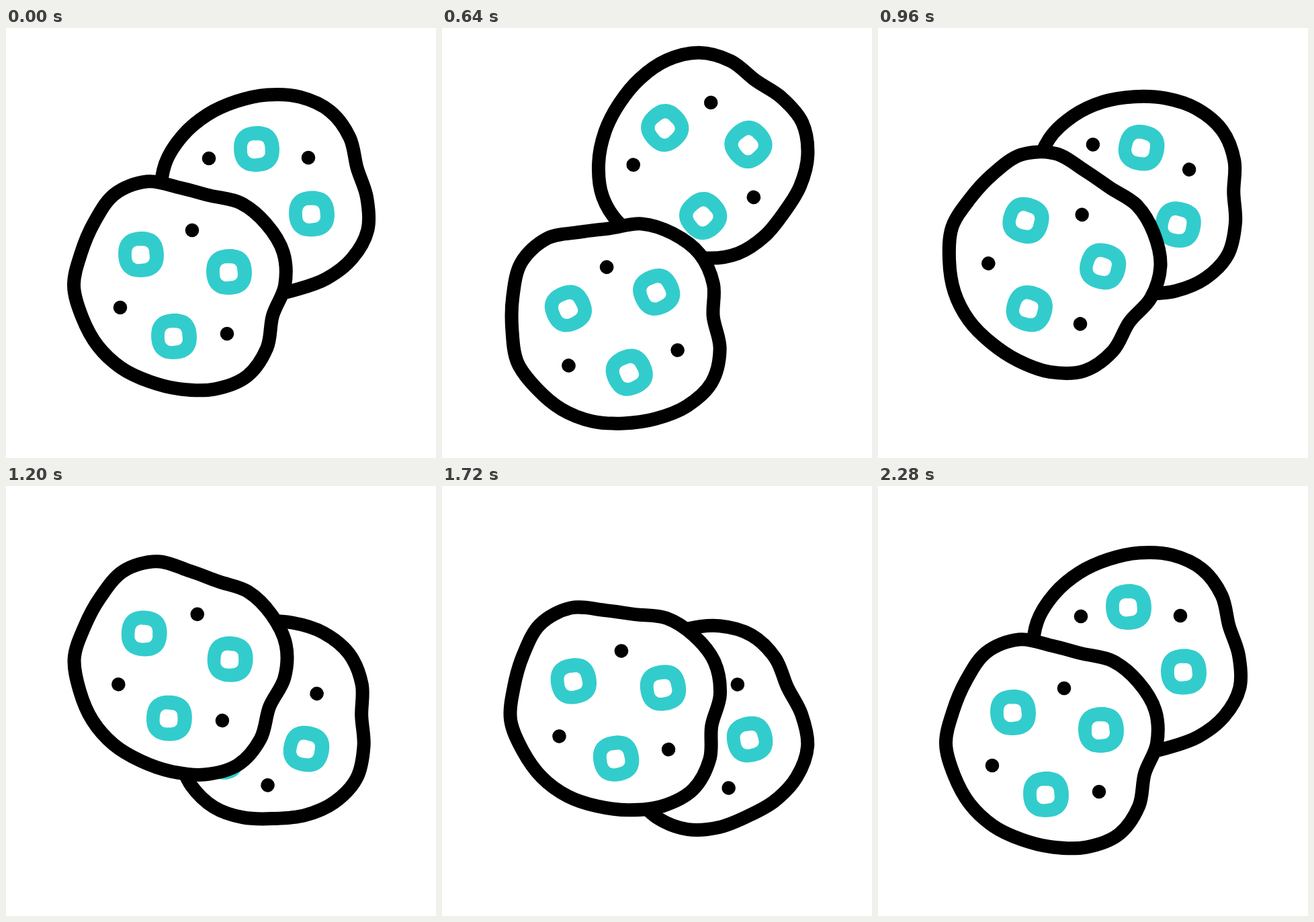
Animation of 640 by 640 pixels, one loop 2.6 s. Source, as an HTML page:

```html
<!DOCTYPE html>
<html lang="en">
<head>
<meta charset="utf-8">
<title>Cookies</title>
<style>
  html, body { margin: 0; width: 100%; height: 100%; overflow: hidden; background: #fff; }
  svg { display: block; width: 100%; height: 100%; }
  .dough { fill: #fff; stroke: #000; stroke-width: 20; }
  .ring { fill: #33cccc; fill-rule: evenodd; }
</style>
</head>
<body>
<svg viewBox="0 0 640 640">
  <g id="back"></g>
  <g id="front"></g>
</svg>
<script>
const LOOP = 2600, STEP = 40;

// Closed smooth curve around the origin from radii at equal angles
function blob(radii) {
  const n = radii.length;
  const at = i => {
    const a = i / n * 2 * Math.PI, r = radii[(i + n) % n];
    return [r * Math.cos(a), r * Math.sin(a)];
  };
  let d = `M${at(0)}`;
  for (let i = 0; i < n; i++) {
    const [p, a, b, q] = [at(i - 1), at(i), at(i + 1), at(i + 2)];
    const c1 = a.map((v, k) => v + (b[k] - p[k]) / 6);
    const c2 = b.map((v, k) => v - (q[k] - a[k]) / 6);
    d += `C${c1} ${c2} ${b}`;
  }
  return d + 'Z';
}

// Slightly square round shape, drawn out towards the lower left
const wave = (deg, k, peak) => Math.cos(k * (deg - peak) * Math.PI / 180);
const pebble = (r, square, pull) => blob(Array.from({ length: 24 }, (_, i) =>
  r + square * wave(i * 15, 4, 42) + pull * wave(i * 15, 1, 140)));
const ring = pebble(34.8, 0.9, 0) + pebble(14.2, 0.9, 1);

function bake({ id, outline, rings, chips }) {
  document.getElementById(id).innerHTML =
    `<path class="dough" d="${blob(outline)}"/>` +
    rings.map(p => `<path class="ring" d="${ring}" transform="translate(${p})"/>`).join('') +
    chips.map(([x, y]) => `<circle cx="${x}" cy="${y}" r="10.3"/>`).join('');
}

// Value of a [time, value] track with eased segments
function track(keys, t) {
  const i = keys.findIndex(k => t < k[0]);
  if (i < 0) return keys[keys.length - 1][1];
  if (i === 0) return keys[0][1];
  const [t0, v0] = keys[i - 1], [t1, v1] = keys[i];
  const p = (t - t0) / (t1 - t0);
  return v0 + (v1 - v0) * p * p * (3 - 2 * p);
}

const bounce = (first, second) => [[0, 0], [580, first], [1360, second], [2000, 0]];
const tilt = [[0, 0], [478, -40], [921, 20], [1490, -10], [2110, 0]];

const cookies = [
  {
    id: 'front', x: 260, y: 383.5, delay: 0, move: bounce(58.5, -133),
    outline: [155, 144, 158.5, 167, 162, 154, 150, 151, 152.5, 154,
      159, 156, 159.5, 168, 163, 145.5, 141, 152, 157, 160.5],
    rings: [[-59, -46.5], [72, -20.5], [-10, 75.5]],
    chips: [[17, -82.5], [-90, 32.5], [69, 71.5]]
  },
  {
    id: 'back', x: 389, y: 252, delay: 118, move: bounce(-58.5, 164),
    outline: [148, 157, 155.5, 149.5, 144, 146.5, 149.5, 147.5, 142.5, 147.5,
      157, 160, 156, 152, 150, 152.5, 157, 158.5, 151.5, 140.5],
    rings: [[-16, -72], [66, 24.5], [-52.6, 66]],
    chips: [[61, -59], [-87, -58], [23.5, 91]]
  }
];

function pose(time) {
  for (const { id, x, y, delay, move } of cookies) {
    const t = time - delay;
    document.getElementById(id).setAttribute('transform',
      `translate(${x} ${y + track(move, t)}) rotate(${track(tilt, t)})`);
  }
}

const start = performance.now();
function tick() {
  const t = performance.now() - start + 5;
  pose(Math.floor(t / STEP) * STEP % LOOP);
  requestAnimationFrame(tick);
}
cookies.forEach(bake);
pose(0);
requestAnimationFrame(tick);
</script>
</body>
</html>
```
